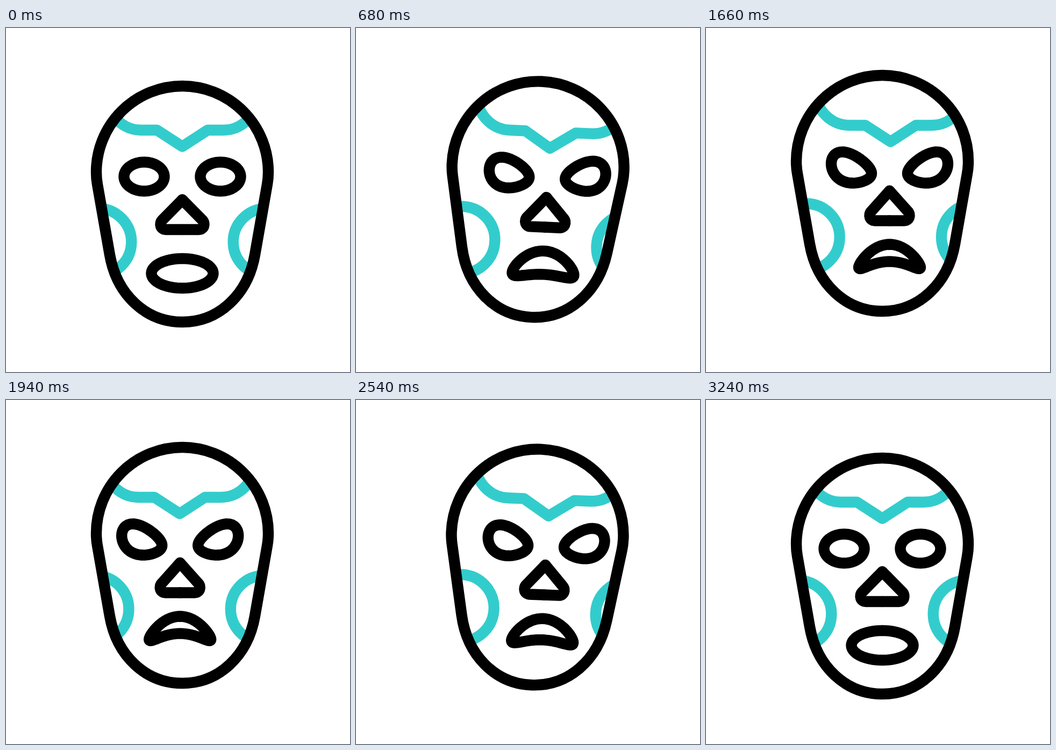
An HTML page for the animation above (3400 ms loop, 640 px wide and 640 px high).

```html
<!DOCTYPE html>
<html lang="en">
<head>
<meta charset="utf-8">
<title>Wrestling mask</title>
<style>
  html, body { margin: 0; width: 100%; height: 100%; overflow: hidden; background: #fff; }
  svg { display: block; width: 100vw; height: 100vh; }
  path, circle { fill: none; stroke-width: 20.4; stroke-linejoin: round; stroke-linecap: round; }
  .ink { stroke: #000; }
  .paint { stroke: #3cc; }
</style>
</head>
<body>
<svg viewBox="0 0 640 640">
  <defs>
    <path id="skull" d="M168 268A160 160 0 0 1 488 268Q488 280 486 291L463 422C450 496 396 547 328 547S206 496 193 422L170 291Q168 280 168 268Z"/>
    <clipPath id="inside"><use href="#skull"/></clipPath>
  </defs>
  <g id="head">
    <g clip-path="url(#inside)">
      <g id="paint" class="paint">
        <path d="M188.5 126.5a63.5 63.5 0 0 0 63.5 63.5h29l47 30.5 47-30.5h29a63.5 63.5 0 0 0 63.5-63.5"/>
        <circle cx="171" cy="398" r="62.3"/>
        <circle cx="485" cy="398" r="62.3"/>
      </g>
    </g>
    <use href="#skull" class="ink"/>
    <g id="face" class="ink">
      <path id="eye"/>
      <use href="#eye" transform="matrix(-1 0 0 1 656 0)"/>
      <path id="nose"/>
      <use href="#nose" transform="matrix(-1 0 0 1 656 0)"/>
      <path id="mouth"/>
    </g>
  </g>
</svg>
<script>
const LOOP = 3400;
const set = (id, name, value) => document.getElementById(id).setAttribute(name, value);

// Closed curve around (cx, cy); y is a function of the cosine and sine
function ring(cx, cy, rx, y) {
  const points = Array.from({ length: 72 }, (_, i) => {
    const a = i * Math.PI / 36, c = Math.cos(a);
    return (cx + rx * c).toFixed(2) + " " + (cy + y(c, Math.sin(a))).toFixed(2);
  });
  return "M" + points.join("L") + "Z";
}

function draw(t) {
  const ramp = (from, to) => {
    const u = Math.min(1, Math.max(0, (t - from) / (to - from)));
    return u * u * (3 - 2 * u);
  };
  const pulse = (a, b, c, d) => ramp(a, b) - ramp(c, d);

  const gaze = 18 * ramp(120, 690) - 23 * ramp(1530, 1990) + 22 * ramp(1990, 2560) - 17 * ramp(2620, 3240);
  const turn = 5.9 * pulse(420, 1000, 1020, 1460) + 2.25 * pulse(2100, 2560, 2600, 3240);
  const lift = -20 * pulse(320, 1100, 2300, 3240);
  const stern = pulse(120, 690, 2580, 3240);
  const fury = pulse(400, 1300, 2260, 2820);

  set("head", "transform", `translate(0 ${lift}) rotate(${turn} 328 510)`);
  set("paint", "transform", `translate(${gaze * 1.14} ${11 * stern})`);
  set("face", "transform", `translate(${gaze} 0)`);

  // Eyes tilt and taper towards the nose
  const tilt = 4.5 * stern + 4.5 * fury, taper = 0.26 * stern;
  set("eye", "d", ring(257, 276.5 + 5 * stern, 37.5, (c, s) => 27 * s * (1 - taper * c) + tilt * c));

  const n = 3.5 * stern;
  set("nose", "d", `M328 ${319.5 + n}L${365 - n} ${357 + n}C${372 - n} ${364 + n} ${368 - n} ${375 + n} ${359 - n} ${375 + n}H328`);

  // Mouth thins while its corners bend down
  const half = 27.5 - 4 * stern - 7.5 * fury, bend = 19 * stern + 8 * fury;
  set("mouth", "d", ring(328, 456.5 - 10 * stern - 8 * fury, 57.5, (c, s) => half * s + bend * c * c));
}

const start = performance.now();
function tick() {
  draw((performance.now() - start) % LOOP);
  requestAnimationFrame(tick);
}
tick();
</script>
</body>
</html>
```
